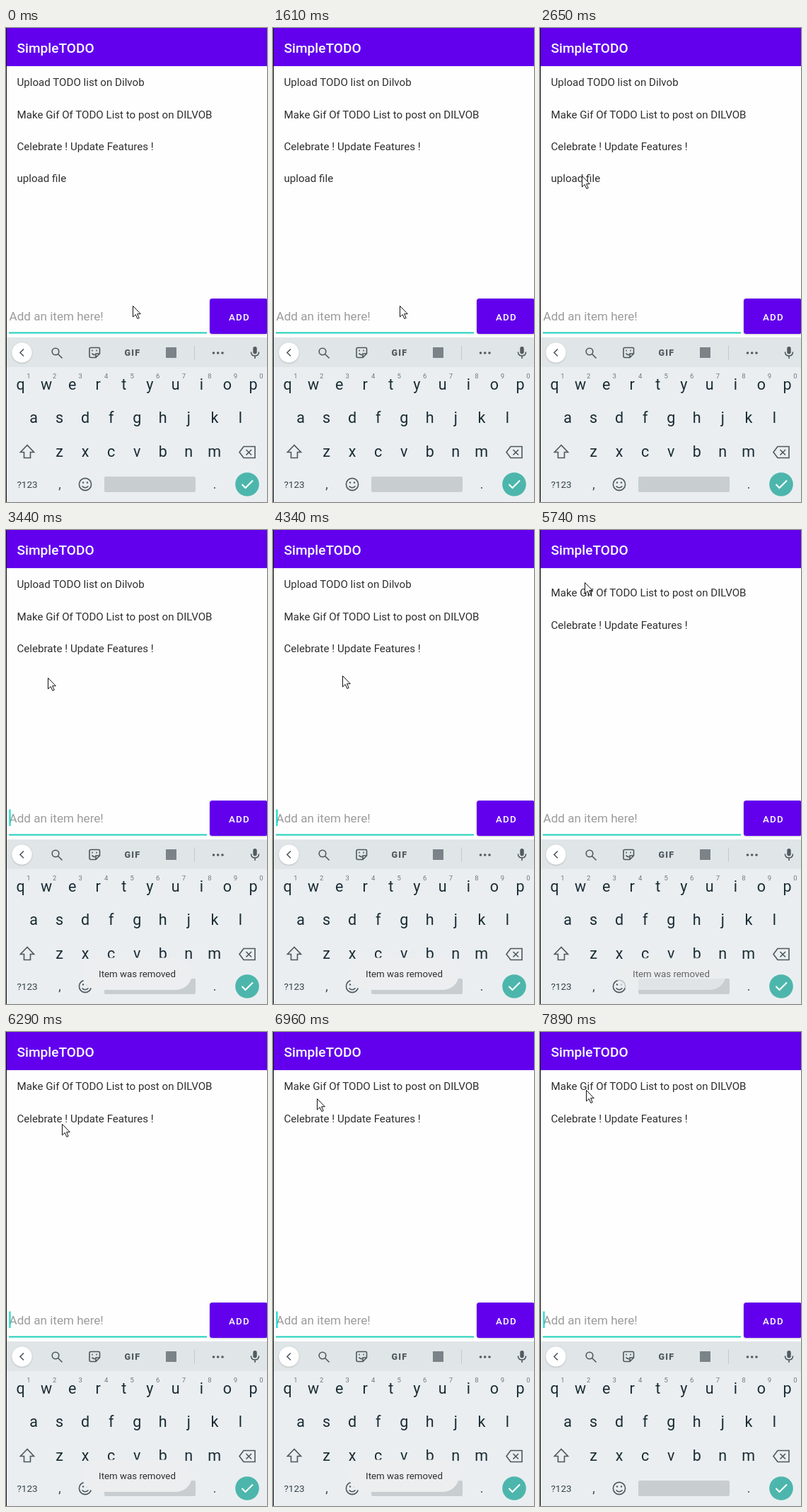
Recreate the animation shown at these times as an HTML page. Size 369 px wide and 671 px high, loop 8000 ms.

```html
<!DOCTYPE html>
<html lang="en">
<head>
<meta charset="utf-8">
<title>To-do list</title>
<style>
  html, body { margin: 0; width: 100%; height: 100%; overflow: hidden; background: #fefefe; }
  svg { display: block; width: 369px; height: 671px; font-family: Roboto, sans-serif; }
  .row { font-size: 15.12px; fill: #2e2e2e; }
  .mid { text-anchor: middle; }
  .letter { font-size: 21.5px; fill: #1a2c34; text-anchor: middle; }
  .mark { font-size: 17.5px; fill: #35444b; text-anchor: middle; }
  .digit { font-size: 9.5px; fill: #70787d; text-anchor: middle; }
  .line { fill: none; stroke: #4c575d; stroke-width: 1.6; }
  .solid { fill: #515b61; }
</style>
</head>
<body>
<svg viewBox="0 0 369 671">
  <defs>
    <filter id="shadow" x="-20%" y="-20%" width="140%" height="150%">
      <feDropShadow dx="0" dy=".7" stdDeviation=".8" flood-opacity=".25"/>
    </filter>
  </defs>
  <rect width="369" height="671" fill="#fefefe"/>
  <g id="rows"></g>

  <rect width="369" height="54" fill="#6200ee"/>
  <text x="15.5" y="35" font-size="19.1" font-weight="500" fill="#fff">SimpleTODO</text>

  <text x="4.5" y="414" font-size="17.1" fill="#9b9b9b">Add an item here!</text>
  <rect x="4" y="430.5" width="280" height="2" fill="#1fcfba"/>
  <rect id="caret" x="4.5" y="395.5" width="2" height="23.5" fill="#03dac5"/>
  <rect x="288" y="383" width="82" height="50" rx="3.5" fill="#6200ee" filter="url(#shadow)"/>
  <text x="330" y="413.5" class="mid" font-size="13.3" font-weight="500" letter-spacing="1.25" fill="#fff">ADD</text>

  <rect y="438" width="369" height="233" fill="#eaeef1"/>
  <rect y="438" width="369" height="42" fill="#e0e5e7"/>
  <circle cx="22.5" cy="459.5" r="14" fill="#fff" filter="url(#shadow)"/>
  <path class="line" d="M25 454.5L20 459.5L25 464.5"/>
  <circle class="line" cx="70" cy="458" r="4.8"/>
  <path class="line" d="M73.5 461.5L79.5 467.5"/>
  <path class="line" d="M120 452.5H131Q132.5 452.5 132.5 454V461L127 466.5H120Q118 466.5 118 464.5V454.5Q118 452.5 120 452.5ZM127 466V461H132M121.5 460.5Q123 463 126 462.5"/>
  <path class="solid" d="M121.2 455.7h1.7v1.7h-1.7zM127.2 455.7h1.7v1.7h-1.7z"/>
  <text x="179" y="463.7" class="mid solid" font-size="12.5" font-weight="900" letter-spacing="1.3">GIF</text>
  <rect class="solid" x="226" y="452" width="15" height="15" fill-opacity=".7"/>
  <path d="M266.5 449.5V470" stroke="#c3c9cc"/>
  <g class="solid">
    <circle cx="293.5" cy="460" r="1.8"/><circle cx="299.7" cy="460" r="1.8"/><circle cx="306" cy="460" r="1.8"/>
    <rect x="349.3" y="451" width="5.4" height="10.5" rx="2.7"/>
  </g>
  <path class="line" d="M346.5 458.5Q346.5 464 352 464T357.5 458.5M352 464V468"/>

  <g id="keys"></g>
  <path class="line" d="M30 590.5L20.5 600.5H25.5V608.5H34.5V600.5H39.5Z"/>
  <path class="line" d="M336 592.5H352V608.5H336L330 600.5ZM339.5 597L347 604.5M347 597L339.5 604.5"/>
  <text x="30" y="651" class="mid" font-size="13.5" fill="#35444b">?123</text>
  <text x="76" y="652" class="mark">,</text>
  <text x="295" y="652" class="mark">.</text>
  <circle class="line" cx="112" cy="646" r="8.6"/>
  <circle class="solid" cx="109" cy="643.5" r="1.2"/><circle class="solid" cx="115" cy="643.5" r="1.2"/>
  <path class="line" d="M107.5 648.5Q112 653 116.5 648.5"/>
  <rect x="139" y="635" width="129" height="22" rx="2" fill="#c8cdd0"/>
  <circle cx="341" cy="646" r="16.8" fill="#4db6ac"/>
  <path d="M333.5 646L338.5 651L349 640.5" fill="none" stroke="#fff" stroke-width="2"/>

  <g id="toast">
    <rect x="107.5" y="605.5" width="155.5" height="45.5" rx="22.7" fill="#eceeef"/>
    <text x="185.5" y="633" class="mid" font-size="13.3" fill="#2e2e2e">Item was removed</text>
  </g>
  <path d="M.5 0V671" stroke="#111"/>
  <path id="pointer" d="M.5 .5V16L4.2 12.6L6.9 18.5L9.2 17.5L6.6 11.7H11.3Z" fill="#fff" stroke="#111" stroke-linejoin="round"/>
</svg>

<script>
const LOOP = 8000, PITCH = 45.35;
const byId = id => document.getElementById(id);
const clamp = v => Math.min(1, Math.max(0, v));
const ramp = (t, from, to) => clamp((t - from) / (to - from));
const ease = p => (1 - Math.cos(Math.PI * p)) / 2;

const pointerHome = { x: 179, y: 393 };
const pointerMoves = [
  { from: 1800, to: 2300, x: 59, y: 209 },
  { from: 3460, to: 3900, x: 141, y: 218 },
  { from: 4050, to: 4330, x: 98, y: 206 },
  { from: 4450, to: 5210, x: 63, y: 74 },
  { from: 5800, to: 6010, x: 86, y: 146 },
  { from: 6150, to: 6530, x: 62, y: 94 },
  { from: 7050, to: 7300, x: 65, y: 82 },
];
const removals = [{ row: 3, at: 2900 }, { row: 0, at: 5480 }];

const labels = ['Upload TODO list on Dilvob', 'Make Gif Of TODO List to post on DILVOB',
  'Celebrate ! Update Features !', 'upload file'];
byId('rows').innerHTML = labels.map(s => `<text class="row" x="15.5">${s}</text>`).join('');
const rows = [...byId('rows').children];

const keyRow = (chars, x, y, cls) => [...chars].map((c, i) =>
  `<text class="${cls}" x="${x + 36.55 * i}" y="${y}">${c}</text>`).join('');
byId('keys').innerHTML = keyRow('qwertyuiop', 20.5, 512, 'letter')
  + keyRow('1234567890', 32, 496, 'digit')
  + keyRow('asdfghjkl', 39, 559, 'letter')
  + keyRow('zxcvbnm', 75.5, 607, 'letter');

function pointerAt(t) {
  let { x, y } = pointerHome;
  for (const move of pointerMoves) {
    const p = ease(ramp(t, move.from, move.to));
    x += (move.x - x) * p;
    y += (move.y - y) * p;
  }
  return [Math.round(x), Math.round(y)];
}

function draw(t) {
  rows.forEach((row, i) => {
    let y = 82.3 + i * PITCH, opacity = 1;
    for (const { row: removed, at } of removals) {
      if (i === removed) opacity = 1 - ramp(t, at, at + 120);
      if (i > removed) y -= PITCH * ease(ramp(t, at + 100, at + 345));
    }
    row.setAttribute('y', y);
    row.setAttribute('opacity', opacity);
  });
  const toast = removals.map(({ at }) =>
    ramp(t, at + 90, at + 330) * (1 - ramp(t, at + 1900, at + 2410)));
  byId('toast').setAttribute('opacity', Math.max(...toast));
  const caretOn = t >= 120 && (t - 120) % 970 < 470;
  byId('caret').setAttribute('opacity', caretOn ? 1 : 0);
  byId('pointer').setAttribute('transform', `translate(${pointerAt(t)})`);
}

const start = performance.now();
function frame() {
  draw((performance.now() - start) % LOOP);
  requestAnimationFrame(frame);
}
frame();
</script>
</body>
</html>
```
